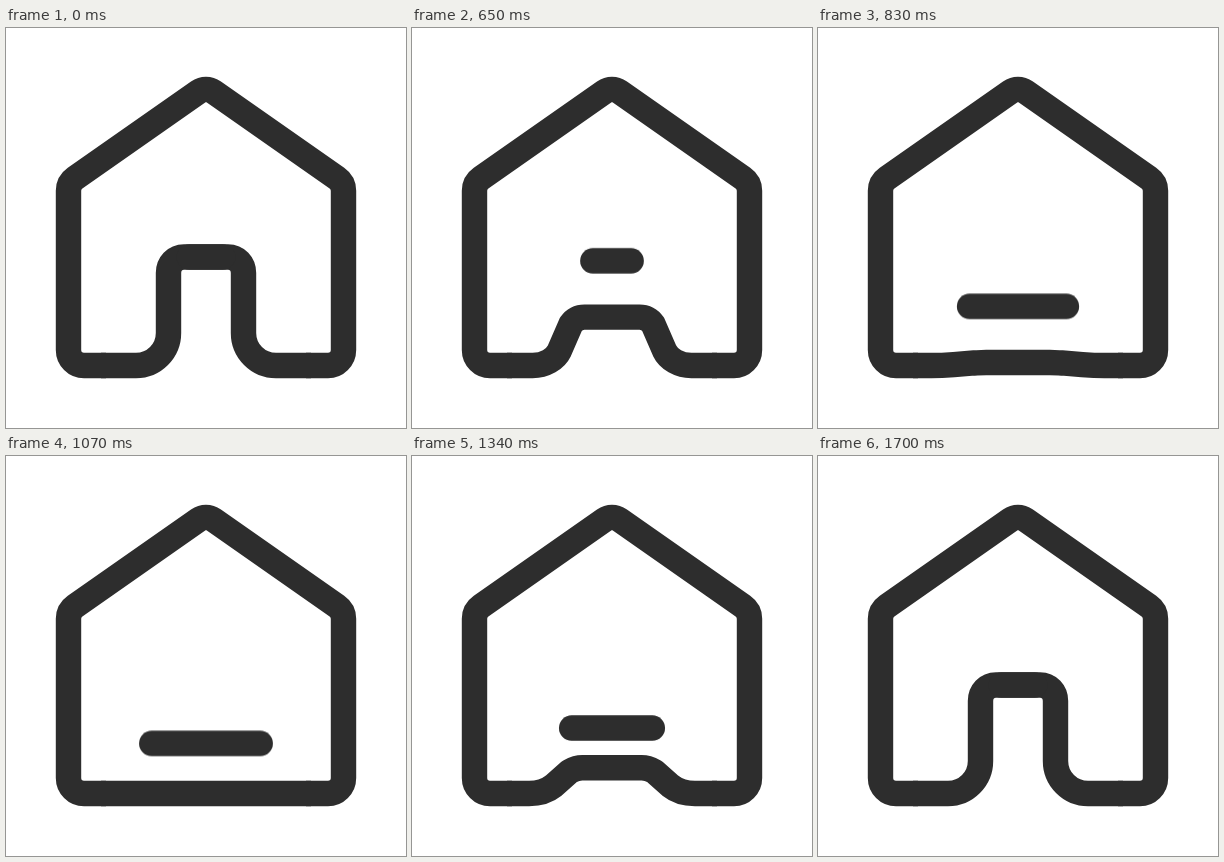
An HTML page that plays this animation: 400 by 400 pixels, repeating every 1.76 s.

```html
<!DOCTYPE html>
<html lang="en">
<head>
<meta charset="utf-8">
<title>Home icon</title>
<style>
  html, body { margin: 0; width: 100%; height: 100%; overflow: hidden; background: #fff; }
  svg { display: block; width: 100vw; height: 100vh; }
  path { fill: none; stroke: #2d2d2d; stroke-width: 25.4; stroke-linejoin: round; }

  .door, .bar, .slide { animation: 1760ms linear infinite; }
  .door { animation-name: door; }
  .bar { animation-name: stretch; stroke-linecap: round; }
  .slide { animation-name: drop; }

  /* The doorway flattens into the floor, waits, then rises again. */
  @keyframes door {
    0%, 96.3%, 100% { d: path("M95 337.5 L130 337.5 C148 337.5 162.5 323 162.5 305 L162.5 245 C162.5 236 169 229 178 229 L222 229 C231 229 237.5 236 237.5 245 L237.5 305 C237.5 323 252 337.5 270 337.5 L305 337.5"); }
    29.55% {
      d: path("M95 337.5 L130 337.5 C148 337.5 162.5 323 162.5 305 L162.5 245 C162.5 236 169 229 178 229 L222 229 C231 229 237.5 236 237.5 245 L237.5 305 C237.5 323 252 337.5 270 337.5 L305 337.5");
      animation-timing-function: cubic-bezier(.46, 0, 0, 1);
    }
    53.3% { d: path("M95 337.5 L113 337.5 C121 337.5 128 337.5 135 337.5 L156 337.5 C161 337.5 163 337.5 168 337.5 L232 337.5 C237 337.5 239 337.5 244 337.5 L265 337.5 C272 337.5 279 337.5 287 337.5 L305 337.5"); }
    66.75% {
      d: path("M95 337.5 L113 337.5 C121 337.5 128 337.5 135 337.5 L156 337.5 C161 337.5 163 337.5 168 337.5 L232 337.5 C237 337.5 239 337.5 244 337.5 L265 337.5 C272 337.5 279 337.5 287 337.5 L305 337.5");
      animation-timing-function: cubic-bezier(.5, 0, .32, 1);
    }
  }

  /* The bar leaves the lintel a little later than the door. */
  @keyframes drop {
    0%, 96%, 100% { transform: translateY(0); }
    32.5% { transform: translateY(0); animation-timing-function: cubic-bezier(.43, 0, 0, 1); }
    63% { transform: translateY(58.5px); }
    66.3% { transform: translateY(58.5px); animation-timing-function: cubic-bezier(.5, 0, .32, 1); }
  }

  @keyframes stretch {
    0%, 96%, 100% { d: path("M183.3 229 L216.7 229"); }
    32.5% { d: path("M183.3 229 L216.7 229"); animation-timing-function: cubic-bezier(.43, 0, 0, 1); }
    63% { d: path("M145.7 229 L254.3 229"); }
    66.3% { d: path("M145.7 229 L254.3 229"); animation-timing-function: cubic-bezier(.39, 0, .32, 1); }
  }
</style>
</head>
<body>
<svg viewBox="0 0 400 400">
  <path d="M100 337.5 H78 A15.5 15.5 0 0 1 62.5 322 V162.8 A15.5 15.5 0 0 1 69.1 150.1 L192.3 63.9 A13.5 13.5 0 0 1 207.7 63.9 L330.9 150.1 A15.5 15.5 0 0 1 337.5 162.8 V322 A15.5 15.5 0 0 1 322 337.5 H300"/>
  <path class="door"/>
  <g class="slide"><path class="bar"/></g>
</svg>
</body>
</html>
```
